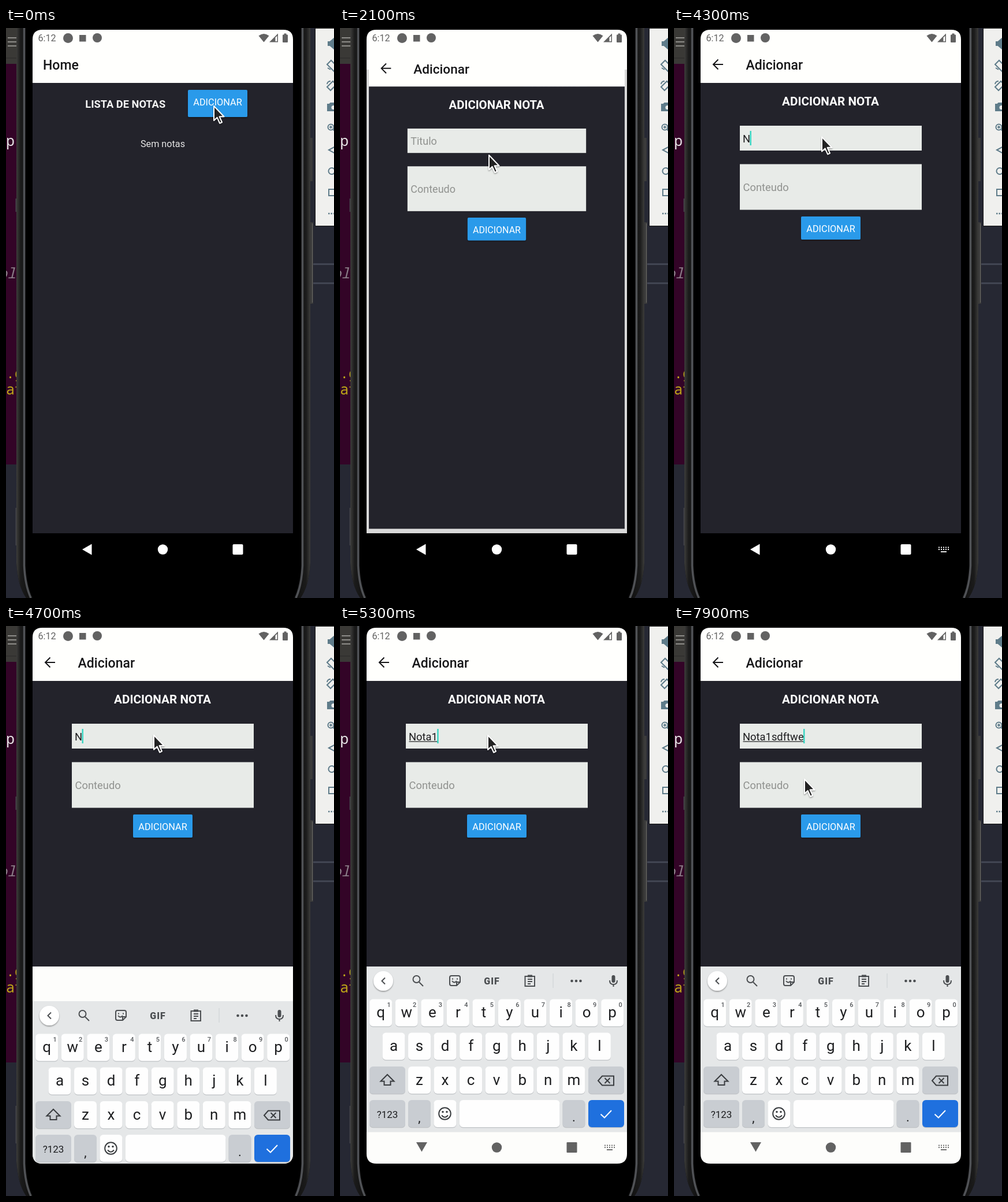
These frames come from a looping animation (568x986 px, 8 s). An HTML page:

```html
<!DOCTYPE html>
<html lang="pt">
<head>
<meta charset="utf-8">
<title>Lista de notas</title>
<style>
html, body { margin: 0; width: 100%; height: 100%; overflow: hidden; background: #262833; }
svg { display: block; width: 568px; height: 986px; font-family: Roboto, sans-serif; }
.mono { font-family: "Noto Sans Mono", "DejaVu Sans Mono", monospace; font-size: 25px; }
.mid { text-anchor: middle; }
.b { font-weight: 700; }
.title { font-size: 23px; font-weight: 500; fill: #161618; }
.btn { font-size: 16.3px; fill: #fff; text-anchor: middle; }
.field { font-size: 18.37px; }
.line { fill: none; stroke-width: 2; }
</style>
</head>
<body>
<svg viewBox="0 0 568 986">
  <defs>
    <clipPath id="app"><rect id="appBox" x="46" y="31" width="451" height="843"/></clipPath>
    <clipPath id="ime"><path d="M46 589H497V913Q497 930 480 930H63Q46 930 46 913Z"/></clipPath>
    <linearGradient id="rim"><stop offset="0" stop-color="#3d3d3b"/><stop offset=".3" stop-color="#1b1b1b"/><stop offset="1" stop-color="#111"/></linearGradient>
    <linearGradient id="rimR"><stop offset="0" stop-color="#111"/><stop offset=".7" stop-color="#1b1b1b"/><stop offset="1" stop-color="#3d3d3b"/></linearGradient>
    <filter id="shade" x="-20%" y="-20%" width="140%" height="150%"><feDropShadow dx="0" dy="1.5" stdDeviation="1" flood-opacity=".4"/></filter>
    <g id="keys" fill="none" stroke-width="1.8">
      <path d="M458 898.5H476M458 902H476" stroke-dasharray="2 2"/><path d="M462 906H472"/>
    </g>
  </defs>

  <!-- desktop behind the phone -->
  <rect width="568" height="986" fill="#262833"/>
  <rect width="24" height="63" fill="#3a3936"/>
  <path d="M0 52H24" stroke="#2a2928"/>
  <path d="M3 17H18M3 24H18M3 31H18" stroke="#aaa9a5" stroke-width="1.6"/>
  <rect y="62" width="24" height="693" fill="#330427"/>
  <g class="mono">
    <text x="0" y="204" fill="#e8e6e7">p</text>
    <text x="-13" y="433" fill="#8b7d88" font-style="italic">ola</text>
    <text x="0" y="606" fill="#c0a818">.g</text>
    <text x="0" y="634" fill="#c0a818">at</text>
  </g>
  <path d="M527 408.5H568M527 441.5H568" stroke="#414552" stroke-width="3"/>

  <!-- emulator side panel -->
  <rect x="535.5" y=".5" width="40" height="342" fill="#f0f0ee" stroke="#111"/>
  <g class="line" stroke="#5f7c8a" stroke-width="1.6">
    <path d="M558 24H561L567 19V35L561 30H558Z" fill="#5f7c8a"/>
    <path d="M556 63L563 56L575 68L568 75ZM562 72L557 69"/>
    <path d="M556 102L566 92L572 98L562 108ZM556 97Q557 92 562 92"/>
    <path d="M557 132H560L562 130H568V143H557Z" fill="#5f7c8a"/>
    <circle cx="567" cy="137.5" r="3.5" fill="#f0f0ee" stroke="none"/>
    <circle cx="562.5" cy="171.5" r="5"/><path d="M566 175L572 181M560 171.5H565M562.5 169V174"/>
    <path d="M559 211L570 205V217Z"/>
    <circle cx="564" cy="247.5" r="5.5"/>
    <rect x="559" y="279" width="11" height="11"/>
    <path d="M558 321H568" stroke-dasharray="2.5 2" stroke-width="2.5"/>
  </g>

  <!-- phone -->
  <path d="M526 190H531V265H526ZM526 336H532V477H526Z" fill="#3b3b3b"/>
  <path d="M530.5 338V475" stroke="#686866"/>
  <path d="M17.5 295V318M17.5 830V895" stroke="#45454a" stroke-width="2"/>
  <path d="M18 0V925Q20 964 35 986H510Q525 964 527 925V0Z" fill="#111"/>
  <path d="M18 0H30V930Q32 964 42 986H35Q20 964 18 925Z" fill="url(#rim)"/>
  <path d="M527 0H515V930Q513 964 503 986H510Q525 964 527 925Z" fill="url(#rimR)"/>
  <path d="M31.5 0V930Q33 964 43 986M513.500 0V930Q512 964 502 986" fill="none" stroke="#505256" stroke-width="3.5"/>
  <path d="M34 0V930Q36 964 46 986H499Q509 964 511 930V0Z" fill="#000"/>

  <!-- app -->
  <path d="M46 100V20Q46 3 63 3H480Q497 3 497 20V100Z" fill="#fffffd"/>
  <g clip-path="url(#app)">
    <rect x="46" y="31" width="451" height="843" fill="#fffffd"/>
    <g id="home">
      <rect x="46" y="3" width="451" height="92" fill="#fffffd"/>
      <rect x="46" y="95" width="451" height="779" fill="#23232b"/>
      <text class="title" x="64" y="72">Home</text>
      <text class="b mid" x="206.7" y="137.5" font-size="18.3" fill="#f4f4f4">LISTA DE NOTAS</text>
      <rect x="315" y="107" width="103" height="47" rx="2" fill="#2b9aea" filter="url(#shade)"/>
      <rect id="press" x="315" y="107" width="103" height="47" rx="2" fill="#000"/>
      <text class="btn" x="366.5" y="133.5">ADICIONAR</text>
      <text class="mid" x="271.5" y="206" font-size="16.2" fill="#e6e6e6">Sem notas</text>
    </g>
    <g id="form">
      <rect x="46" y="3" width="451" height="92" fill="#fffffd"/>
      <rect x="46" y="95" width="451" height="779" fill="#23232b"/>
      <path class="line" d="M85 63H68M76.5 54.5L68 63L76.5 71.5" stroke="#161618" stroke-width="2.3"/>
      <text class="title" x="124.5" y="72">Adicionar</text>
      <text class="b mid" x="271" y="134.3" font-size="20.7" fill="#fff">ADICIONAR NOTA</text>
      <rect x="114" y="169" width="315" height="43" fill="#e8ebe8"/>
      <text id="hint" class="field" x="119.5" y="197.7" fill="#90928f">Titulo</text>
      <text id="typed" class="field" x="119" y="197.7" fill="#1c1c1e"></text>
      <rect id="under" x="119.5" y="199.3" height="1.2" fill="#1c1c1e"/>
      <rect id="caret" y="178" width="2.4" height="25" fill="#35d5c2"/>
      <rect x="114" y="235.5" width="315" height="79" fill="#e8ebe8"/>
      <text class="field" x="119.5" y="282" fill="#90928f">Conteudo</text>
      <rect x="220" y="326" width="103" height="40" rx="2" fill="#2b9aea" filter="url(#shade)"/>
      <text class="btn" x="271.5" y="353">ADICIONAR</text>
    </g>
  </g>

  <!-- status bar -->
  <g fill="#626262">
    <text x="55.5" y="23" font-size="16.2">6:12</text>
    <circle cx="107.5" cy="17.5" r="8.5"/>
    <rect x="127" y="12" width="11.5" height="11.5"/>
    <circle cx="158" cy="17" r="8"/>
    <path d="M437.5 13.5Q446.5 6.5 455.5 13.5L446.5 24.5Z"/>
    <path d="M456 24.5L471 9.5V24.5Z"/>
    <path d="M466.5 16.5L469.5 13.5V23H466.5Z" fill="#fffffd"/>
    <path d="M479 12.5Q479 11.5 480 11.5H481.5V9.5H485.5V11.5H487Q488 11.5 488 12.5V24Q488 25 487 25H480Q479 25 479 24Z"/>
  </g>

  <!-- navigation bar, dark -->
  <g fill="#fff">
    <path d="M132 902L148.5 892.5V911.5Z"/>
    <circle cx="271.5" cy="902" r="8.7"/>
    <rect x="392.5" y="893" width="18" height="18" rx="2"/>
    <use id="keysDark" href="#keys" stroke="#fff"/>
  </g>

  <!-- on-screen keyboard -->
  <g id="ime-window" clip-path="url(#ime)">
    <rect x="46" y="589" width="451" height="341" fill="#fdfdfb"/>
    <g id="board">
      <rect x="46" y="589" width="451" height="286.5" fill="#e5e7e8"/>
      <circle cx="75" cy="614" r="17" fill="#fff" filter="url(#shade)"/>
      <g class="line" stroke="#4b4e51">
        <path d="M78 608.5L72.5 614L78 619.5"/>
        <circle cx="132.5" cy="611" r="6"/><path d="M137 616L144 623"/>
        <path d="M193 605H205Q208 605 208 608V616L202 622H193Q190 622 190 619V608Q190 605 193 605ZM208 616H202V622M194 614Q198 619 202 614"/>
        <path d="M195 609.5V611.5M203 609.5V611.5"/>
        <path d="M320.5 606H337V623H320.5ZM325 611H333M325 615H333M325 619H330"/>
        <path d="M325 605.5H333" stroke-width="4"/>
        <path d="M369 601V626" stroke="#ccd0d2" stroke-width="1"/>
        <path d="M467 613Q467 620 473.5 620T480 613M473.5 620V624"/>
      </g>
      <rect x="470.5" y="604" width="6" height="13" rx="3" fill="#4b4e51"/>
      <g fill="#4b4e51"><circle cx="401.5" cy="614" r="2.3"/><circle cx="409" cy="614" r="2.3"/><circle cx="416.5" cy="614" r="2.3"/></g>
      <text class="mid" x="263" y="619.5" font-size="16" font-weight="900" letter-spacing="1" fill="#4b4e51">GIF</text>
      <g id="letters"></g>
      <g class="line" stroke="#3a3d40">
        <path d="M82 776L93.5 787.5H87.5V794H76.5V787.5H70.5Z"/>
        <path d="M454 778.5H474V794.5H454L447 786.5ZM458.5 782L467.5 791M467.5 782L458.5 791"/>
        <circle cx="181.5" cy="843.5" r="10.3"/><path d="M176 846.5Q181.5 853 187 846.5"/>
        <path d="M451.5 844.5L458 850.5L470 838" stroke="#fff"/>
      </g>
      <g fill="#3a3d40"><circle cx="178" cy="840.5" r="1.7"/><circle cx="185" cy="840.5" r="1.7"/></g>
    </g>
    <g id="navLight" fill="#626262">
      <path id="back" d="M132 893H151L141.5 909.5Z"/>
      <circle cx="271.5" cy="902" r="8.7"/>
      <rect x="392.5" y="893" width="18" height="18" rx="1"/>
    </g>
    <use id="keysLight" href="#keys" stroke="#707070"/>
  </g>

  <path id="mouse" d="M1 1V26L6.7 20.8L11.2 30.8L15 29L10.6 19.3H18.5Z" fill="#232323" stroke="#fff" stroke-width="2" stroke-linejoin="round" filter="url(#shade)"/>
</svg>
<script>
const LOOP = 8000, STEP = 100;
const OPEN_AT = 1930, OPEN_TIME = 400;
const $ = id => document.getElementById(id);
const set = (id, name, value) => $(id).setAttribute(name, value);
const show = (id, on) => set(id, 'opacity', +on);
const clamp = x => Math.max(0, Math.min(1, x));

// keyboard keys
function key(x, y, w, label, fill = '#fefefe', size = 26, dy = 9, hint = '') {
  const mid = x + w / 2;
  return `<rect x="${x}" y="${y + 1.3}" width="${w}" height="47" rx="6" fill="#bfc2c5"/>` +
    `<rect x="${x}" y="${y}" width="${w}" height="47" rx="6" fill="${fill}"/>` +
    `<text class="mid" x="${mid}" y="${y + 22.5 + dy}" font-size="${size}" fill="#1d1e20">${label}</text>` +
    `<text class="mid" x="${mid + 14}" y="${y + 13}" font-size="11" font-weight="500" fill="#55585b">${hint}</text>`;
}
const row = (text, x, y, hints = '') =>
  [...text].map((c, i) => key(x + 44.55 * i, y, 39, c, undefined, 26, 9, hints[i])).join('');
const GREY = '#c9cdd2';
$('letters').innerHTML =
  row('qwertyuiop', 51.2, 645.5, '1234567890') + row('asdfghjkl', 73.5, 703.5) + row('zxcvbnm', 118, 762) +
  key(51, 762, 62, '', GREY) + key(430, 762, 62, '', GREY) +
  key(51, 820, 62, '?123', GREY, 17, 8) + key(118, 820, 39, ',', GREY, 22, 15) +
  key(162.5, 820, 39, '') + key(207, 820, 173.5, '') +
  key(385.5, 820, 39, '.', GREY, 22, 14) + key(430, 820, 62, '', '#1f70de');

// pointer stops: time, x, y
const PATH = [
  [0, 359, 134], [600, 359, 134], [900, 348, 142], [1200, 348, 142], [1300, 235, 138], [1400, 235, 138],
  [1800, 250, 195], [2100, 257, 219], [2300, 257, 210], [2400, 257, 210], [2500, 259, 180], [2600, 259, 180],
  [2900, 255, 187], [5400, 255, 188], [5700, 249, 262], [6000, 249, 262], [6100, 249, 268], [6800, 249, 268],
  [7000, 239, 283], [7100, 239, 283], [7400, 226, 266], [7500, 226, 266], [7900, 225, 264]
];
// time, typed letters, underlined letters
const WORD = 'Nota1sdftwe';
const TYPING = [[0, 0, 0], [4300, 1, 0], [5100, 2, 2], [5300, 5, 5], [6600, 7, 6], [6900, 7, 7],
  [7000, 8, 7], [7200, 9, 8], [7400, 10, 9], [7600, 11, 10], [7900, 11, 11]];
const CARET = [[0, 0], [3100, 1], [3600, 0], [4100, 1], [6100, 0], [6600, 1]];
const SLIDE = [[4700, 60], [4800, 6], [4900, 2], [5000, 0]];

const last = (list, t) => list.filter(k => k[0] <= t).pop();

function along(list, t) {
  const a = last(list, t), b = list.find(k => k[0] > t) || a;
  const f = a === b ? 0 : (t - a[0]) / (b[0] - a[0]);
  return [1, 2].map(i => a[i] + (b[i] - a[i]) * f);
}

// cubic-bezier(.35, .45, 0, 1)
function ease(x) {
  let lo = 0, hi = 1, s = .5;
  for (let i = 0; i < 24; i++) {
    s = (lo + hi) / 2;
    if (1.05 * (1 - s) ** 2 * s + s ** 3 < x) lo = s; else hi = s;
  }
  return 1.35 * (1 - s) ** 2 * s + 3 * (1 - s) * s * s + s ** 3;
}

const zoom = (id, k) => set(id, 'transform', `translate(271.5 444) scale(${k}) translate(-271.5 -444)`);
const textWidth = n => n ? $('typed').getSubStringLength(0, n) : 0;

function draw(t) {
  // screen change
  const p = ease(clamp((t - OPEN_AT) / OPEN_TIME));
  zoom('home', 1 + .075 * p);
  show('home', clamp((1 - p) / .7));
  zoom('form', .85 + .15 * p);
  show('form', clamp((p - .75) / .12));
  show('press', t < 900 ? 0 : .115 * clamp((1800 - t) / 400));

  // title field
  const [, n, lined] = last(TYPING, t);
  $('typed').textContent = WORD.slice(0, n);
  show('hint', !n);
  set('under', 'width', textWidth(lined));
  set('caret', 'x', 119 + textWidth(n) - (n ? .6 : 0));
  show('caret', last(CARET, t)[1]);

  // keyboard
  const open = t >= 4700;
  show('ime-window', open);
  set('appBox', 'height', open ? 558 : 843);
  set('board', 'transform', `translate(0 ${open ? last(SLIDE, t)[1] : 0})`);
  show('keysDark', t >= 3700 && !open);
  show('keysLight', t >= 5100);
  show('navLight', clamp((t - 4770) / 300));
  set('back', 'transform', `rotate(${90 * (1 - clamp((t - 4700) / 300))} 141.5 901)`);

  set('mouse', 'transform', `translate(${along(PATH, t)})`);
}

const start = performance.now();
function tick() {
  const t = (performance.now() - start) % LOOP;
  draw(Math.floor(t / STEP) * STEP);
  requestAnimationFrame(tick);
}
tick();
</script>
</body>
</html>
```
